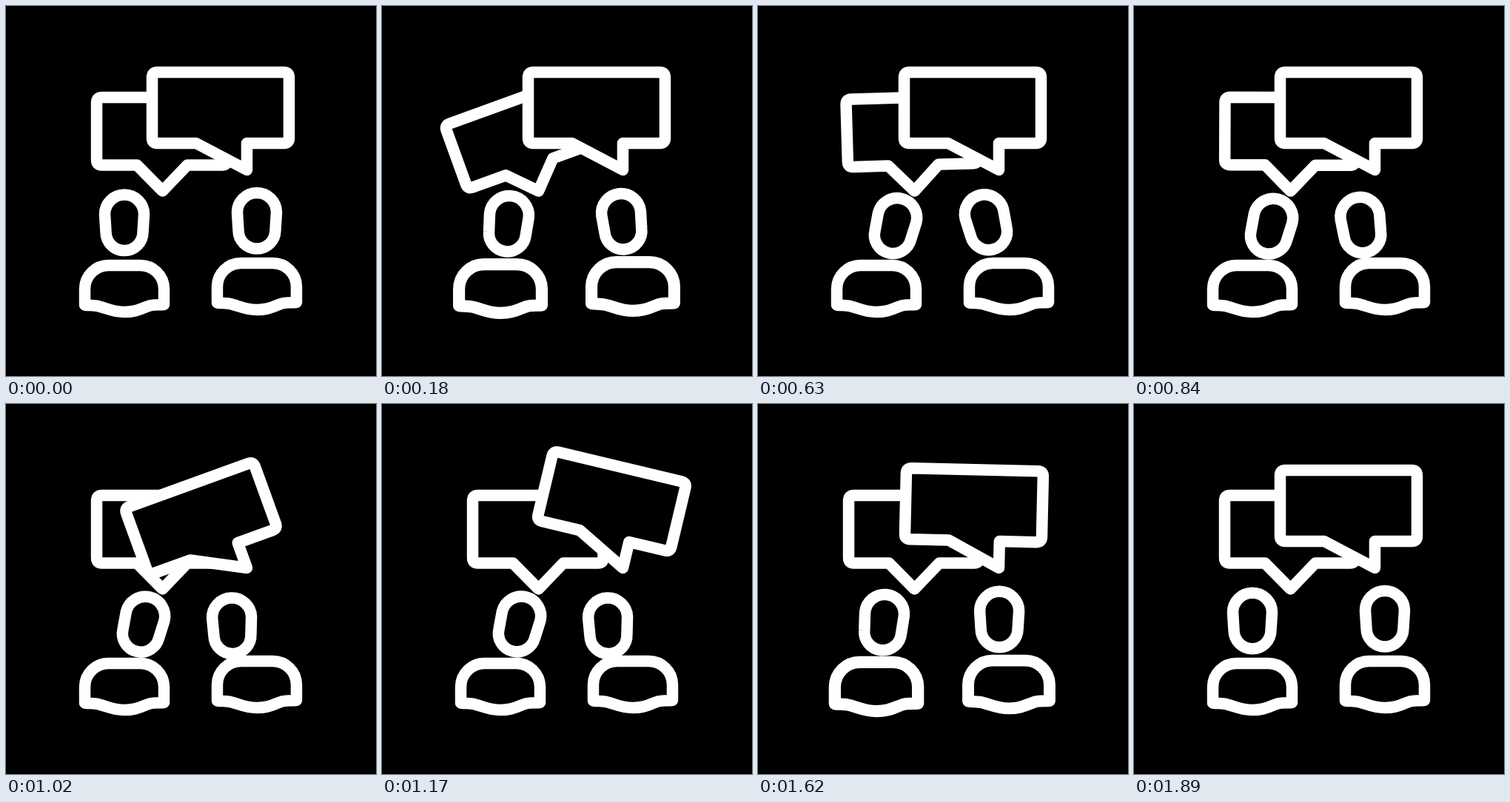
Animation, 500 px wide and 500 px high, one loop 1920 ms. Source, as an HTML page:

```html
<!DOCTYPE html>
<html lang="en">
<head>
<meta charset="utf-8">
<title>Conversation</title>
<style>
  html, body { margin: 0; width: 100%; height: 100%; overflow: hidden; background: #000; }
  svg { display: block; width: 100%; height: 100%; }
  path { fill: #000; stroke: #fff; stroke-width: 15.5; stroke-linejoin: round; }
</style>
</head>
<body>
<svg viewBox="0 0 500 500">
  <defs>
    <path id="body" d="M-53.5 22V0A32 32 0 0 1 -21 -31.5H21A32 32 0 0 1 53.5 0V21.5C46 22 41 21 34 23C22 27 16 31.500 0 31.500S-22 27-34 24C-41 22-47 23-53.500 22Z"/>
    <path id="head" d="M-26.500 -11A26.500 26.500 0 0 1 26.500 -11L25 13A25 25 0 0 1 -25 13Z"/>
  </defs>
  <use id="bodyL" href="#body"/>
  <use id="bodyR" href="#body"/>
  <use id="headL" href="#head"/>
  <use id="headR" href="#head"/>
  <path id="bubbleBack"/>
  <path id="bubbleFront"/>
</svg>
<script>
const LOOP = 1920, FRAME = 30;
const byId = id => document.getElementById(id);
const place = (id, transform) => byId(id).setAttribute("transform", transform);

const clamp = v => Math.min(1, Math.max(0, v));
const ease = f => (1 - Math.cos(Math.PI * clamp(f))) / 2;
const ramp = (t, from, to) => ease((t - from) / (to - from));
const pulse = (t, from) => 1 + 0.05 * Math.sin(Math.PI * clamp((t - from) / 300)) ** 2;

// Rounded box whose tail runs along the bottom edge: root, tip, root
function bubblePath(x0, y0, x1, y1, tailRight, tipX, tipY, tailLeft) {
  const r = 7;
  return `M${x0 + r} ${y0}H${x1 - r}Q${x1} ${y0} ${x1} ${y0 + r}V${y1 - r}Q${x1} ${y1} ${x1 - r} ${y1}` +
    `H${tailRight}L${tipX} ${tipY}L${tailLeft} ${y1}H${x0 + r}Q${x0} ${y1} ${x0} ${y1 - r}V${y0 + r}Q${x0} ${y0} ${x0 + r} ${y0}Z`;
}
byId("bubbleBack").setAttribute("d", bubblePath(122.5, 123.5, 299, 215, 245, 211.5, 250, 177));
byId("bubbleFront").setAttribute("d", bubblePath(197.5, 89.5, 382.5, 185.5, 325.5, 325.5, 221.5, 257));

// Fading wobble: evenly spaced extremes, eased in between
const extremes = [0, -20, 14.5, -9.2, 2.3, 0];
function wobble(t) {
  const step = clamp(t / 875) * 5;
  const i = Math.min(4, Math.floor(step));
  return extremes[i] + (extremes[i + 1] - extremes[i]) * ease(step - i);
}

function drawPerson(side, bodyX, bodyY, scale, headX, headY, angle) {
  place("body" + side, `translate(${bodyX} ${bodyY}) scale(${scale})`);
  place("head" + side, `translate(${headX} ${headY}) rotate(${angle})`);
}

function draw(t) {
  const leanL = ramp(t, 0, 400) - ramp(t, 1300, 1860);
  const sag = Math.sin(Math.PI * t / LOOP);
  drawPerson("L", 160, 382, pulse(t, 0) * pulse(t, 1470),
    160 + 25.5 * leanL, 292.5 + 5 * sag, 14 * leanL);

  const leanR = ramp(t, 0, 370) - ramp(t, 1400, 1800);
  const tilt = ramp(t, 0, 370) - ramp(t, 700, 980);
  const speak = ramp(t, 700, 980) - ramp(t, 1170, 1450);
  drawPerson("R", 339, 379, pulse(t, 0) * pulse(t, 1400),
    339 - 30.5 * leanR - 3 * speak, 290 + 2 * leanR + 7.5 * speak, -14 * tilt - 2 * speak);

  place("bubbleBack", `rotate(${wobble(t)} 211.5 250)`);
  place("bubbleFront", `rotate(${wobble(t - 840)} 325.5 221.5)`);
}

const start = performance.now();
function tick() {
  const t = (performance.now() - start) % LOOP;
  draw(Math.floor(t / FRAME) * FRAME);
  requestAnimationFrame(tick);
}
draw(0);
requestAnimationFrame(tick);
</script>
</body>
</html>
```
